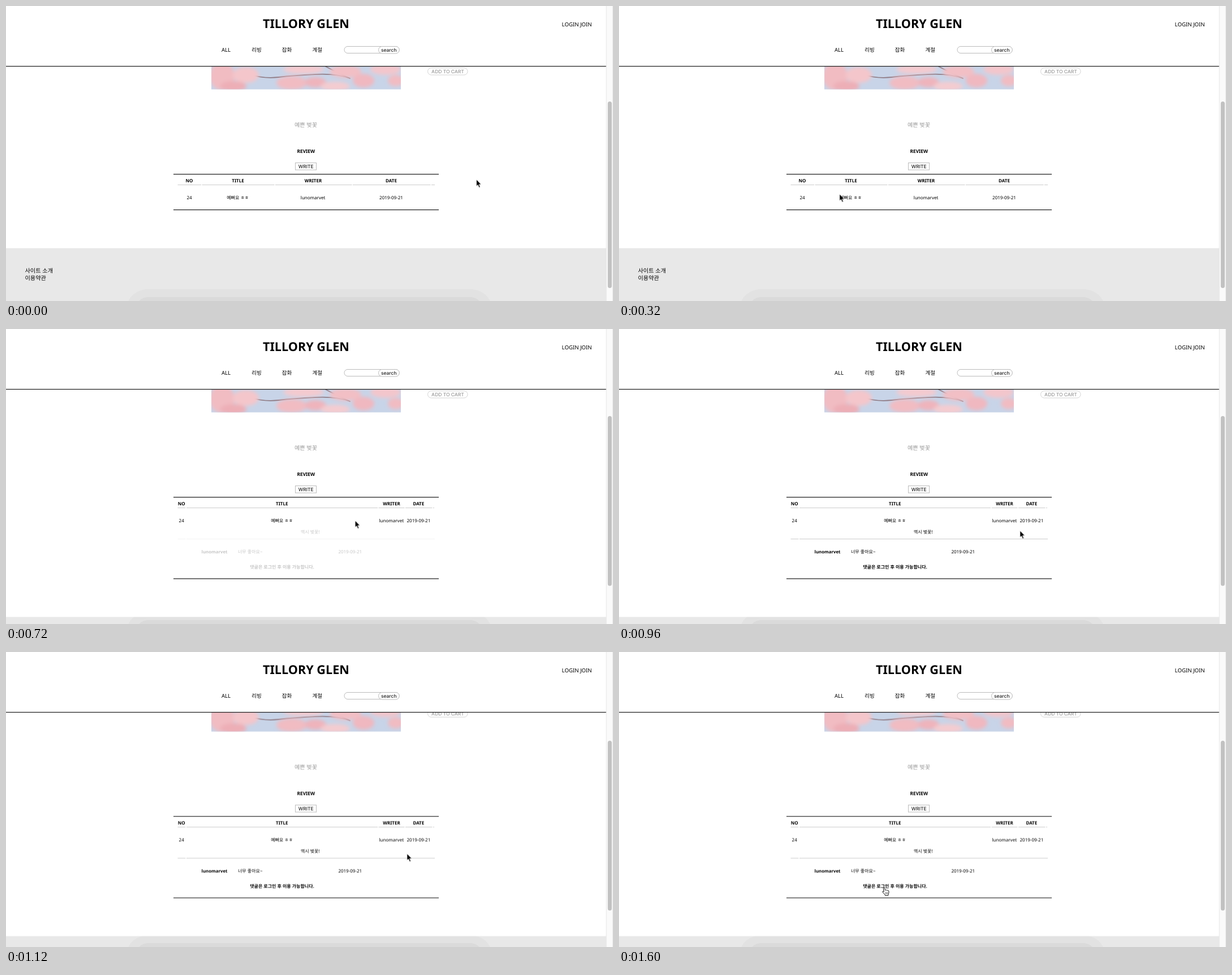
An HTML page that plays this animation: 1073x522 px, repeating every 1.68 s.

```html
<!DOCTYPE html>
<html lang="ko">
<head>
<meta charset="utf-8">
<title>Review page</title>
<style>
html, body { margin: 0; width: 100%; height: 100%; overflow: hidden; background: #fff; }
svg { display: block; width: 1073px; height: 522px; }
text {
  font: 500 8px "Noto Sans", "Noto Sans CJK KR", "Noto Sans CJK", sans-serif;
  fill: #000; text-rendering: geometricPrecision;
}
.mid { text-anchor: middle; }
.bold, .bold text { font-weight: 700; }
.ui { font-family: Inter, "Liberation Sans", sans-serif; font-size: 8.5px; fill: #222; }
.nav { font-size: 9.5px; }
.login { font-size: 9.6px; }
.large { font-size: 10.2px; }
.logo { font-size: 21.6px; }
.rule { stroke: #222; stroke-width: 1.3; }
.hair { stroke: #ccc; stroke-width: 1; }
.pill { fill: #fff; stroke: #bbb; }

.page, .sheet, .closed, .open, .fade, .thumb, .cursor, .arrow, .hand {
  animation: 1680ms step-end infinite;
}
.page { animation-name: scroll; }
.sheet { animation-name: grow; }
.closed { animation-name: hide; }
.open { animation-name: show; }
.fade { animation-name: fade; }
.thumb { animation-name: thumb; }
.cursor { animation-name: move; }
.arrow { animation-name: arrow; }
.hand { animation-name: hand; }

@keyframes scroll {
  0% { transform: none; }
  61.9% { transform: translateY(-3px); }
  66.66%, 100% { transform: translateY(-6.7px); }
}
@keyframes grow {
  0% { transform: none; }
  42.85%, 100% { transform: translateY(81px); }
}
@keyframes hide { 0% { opacity: 1; } 42.85%, 100% { opacity: 0; } }
@keyframes show { 0% { opacity: 0; } 42.85%, 100% { opacity: 1; } }
@keyframes fade {
  0% { opacity: .22; }
  47.61% { opacity: .55; }
  52.38% { opacity: .85; }
  57.14%, 100% { opacity: 1; }
}
@keyframes thumb {
  0% { y: 169px; height: 330px; }
  42.85% { y: 154px; height: 300.5px; }
  61.9% { y: 155.4px; height: 300.5px; }
  66.66%, 100% { y: 157px; height: 300.5px; }
}
@keyframes move {
  0% { transform: translate(831px, 306.5px); }
  4.76% { transform: translate(806px, 340px); }
  9.52% { transform: translate(600px, 382px); }
  14.28% { transform: translate(349px, 350px); }
  19.04% { transform: translate(389.3px, 332.3px); }
  23.8% { transform: translate(391px, 333px); }
  28.57% { transform: translate(393px, 334px); }
  33.33% { transform: translate(394px, 335px); }
  38.09% { transform: translate(395.3px, 335.5px); }
  42.85% { transform: translate(616.6px, 338.5px); }
  47.61% { transform: translate(675px, 350px); }
  52.38% { transform: translate(703px, 355px); }
  57.14% { transform: translate(708.3px, 356.3px); }
  71.42% { transform: translate(640px, 372px); }
  76.19% { transform: translate(480px, 395px); }
  80.95% { transform: translate(372px, 412px); }
  85.71% { transform: translate(420px, 416px); }
  90.47% { transform: translate(458px, 416px); }
  95.23%, 100% { transform: translate(465px, 416px); }
}
@keyframes arrow { 0% { opacity: 1; } 90.47%, 100% { opacity: 0; } }
@keyframes hand { 0% { opacity: 0; } 90.47%, 100% { opacity: 1; } }
</style>
</head>
<body>
<svg viewBox="0 0 1073 522">
  <defs>
    <clipPath id="frame"><rect x="363" y="60" width="335" height="87.5"/></clipPath>
    <filter id="soft" x="-20%" y="-20%" width="140%" height="140%"><feGaussianBlur stdDeviation="3"/></filter>
  </defs>

  <!-- footer, uncovered by the white sheet above it -->
  <rect width="1073" height="522" fill="#e8e8e8"/>
  <rect x="214" y="501" width="644" height="90" rx="38" ry="32" fill="#e2e2e2"/>
  <rect x="228" y="515" width="616" height="90" rx="24" fill="#dadada"/>

  <g class="page">
    <g class="sheet">
      <rect y="-100" width="1073" height="528.5" fill="#fff"/>
      <text class="large" x="33.5" y="471.5">사이트 소개</text>
      <text class="large" x="33.5" y="485">이용약관</text>
    </g>

    <g clip-path="url(#frame)">
      <rect x="363" y="60" width="335" height="88" fill="#c8d4e8"/>
      <path d="M430 121Q456 129 482 126T546 121T608 128M565 107Q588 119 608 128"
        fill="none" stroke="#8f7c86" stroke-width="1.8" stroke-linecap="round"/>
      <g filter="url(#soft)" fill="#f1bcc2">
        <ellipse cx="382" cy="124" rx="22" ry="25"/>
        <ellipse cx="424" cy="122" rx="23" ry="14" fill="#f4c6cb"/>
        <ellipse cx="402" cy="142" rx="23" ry="9" fill="#edaeb6"/>
        <ellipse cx="505" cy="136" rx="27" ry="12"/>
        <ellipse cx="526" cy="112" rx="36" ry="8" fill="#f4cacf"/>
        <ellipse cx="547" cy="135" rx="19" ry="9" fill="#efb4bc"/>
        <ellipse cx="600" cy="116" rx="28" ry="11" fill="#f2bfc5"/>
        <ellipse cx="582" cy="142" rx="26" ry="8" fill="#f4ccd0"/>
        <ellipse cx="632" cy="132" rx="19" ry="12" fill="#f0b8c0"/>
        <ellipse cx="671" cy="112" rx="27" ry="10" fill="#f3c6cc"/>
        <ellipse cx="689" cy="132" rx="14" ry="10"/>
      </g>
    </g>

    <rect class="pill" x="745.5" y="109.5" width="70.5" height="12.5" rx="6.2" style="stroke:#d3d3d3"/>
    <text class="ui mid" x="781" y="118.5" style="fill:#999">ADD TO CART</text>
    <text class="large mid" x="530" y="214" style="fill:#999">예쁜 벚꽃</text>
    <text class="mid bold" x="530.3" y="259.5" style="font-size:8.4px">REVIEW</text>
    <rect x="511.5" y="277.5" width="37" height="12.5" fill="#fff" stroke="#bbb"/>
    <text class="ui mid" x="530.2" y="286.8">WRITE</text>
    <path class="rule" d="M296 297.7H765"/>

    <g class="closed">
      <path class="hair" d="M303.5 316.5H345M346.5 316.5H474.5M476 316.5H611.5M613 316.5H750.5M752 316.5H758"/>
      <g class="mid bold">
        <text x="324" y="312.3">NO</text>
        <text x="410" y="312.3">TITLE</text>
        <text x="543" y="312.3">WRITER</text>
        <text x="681" y="312.3">DATE</text>
      </g>
      <g class="mid">
        <text x="324" y="342.4">24</text>
        <text x="409.7" y="342.4">예뻐요 ㅎㅎ</text>
        <text x="542.6" y="342.4">lunomarvet</text>
        <text x="681" y="342.4">2019-09-21</text>
      </g>
      <path class="rule" d="M296 360.6H765"/>
    </g>

    <g class="open">
      <path class="hair" d="M303.5 316.5H317.5M319 316.5H657M658.5 316.5H704.5M706 316.5H753.5M755 316.5H757"/>
      <g class="mid bold">
        <text x="310.2" y="312.3">NO</text>
        <text x="487.8" y="312.3">TITLE</text>
        <text x="681.5" y="312.3">WRITER</text>
        <text x="729.3" y="312.3">DATE</text>
      </g>
      <g class="mid">
        <text x="310.2" y="342.4">24</text>
        <text x="487.6" y="342.4">예뻐요 ㅎㅎ</text>
        <text x="681.3" y="342.4">lunomarvet</text>
        <text x="729.4" y="342.4">2019-09-21</text>
      </g>
      <g class="fade">
        <text class="mid" x="537.8" y="361.6">역시 벚꽃!</text>
        <path class="hair" d="M303.5 371.6H317.5M319 371.6H758"/>
        <text class="bold" x="345.6" y="396.8" style="font-size:7.8px">lunomarvet</text>
        <text x="410" y="396.8">너무 좋아요~</text>
        <text x="587.4" y="396.8">2019-09-21</text>
        <text class="mid bold" x="488" y="423.8">댓글은 로그인 후 이용 가능합니다.</text>
      </g>
      <path class="rule" d="M296 441.8H765"/>
    </g>
  </g>

  <!-- fixed header -->
  <rect width="1061" height="106.5" fill="#fff"/>
  <path class="rule" d="M0 106.7H1061"/>
  <text class="logo mid bold" x="530.4" y="38.8">TILLORY GLEN</text>
  <text class="login" x="982.6" y="35.7">LOGIN JOIN</text>
  <g class="mid">
    <text class="nav" x="389" y="81">ALL</text>
    <text class="nav" x="443" y="81">리빙</text>
    <text class="nav" x="496.5" y="81">잡화</text>
    <text class="nav" x="550.3" y="81">계절</text>
  </g>
  <rect class="pill" x="598" y="71.5" width="97" height="12" rx="6"/>
  <rect class="pill" x="658.5" y="71.5" width="36.8" height="12.5" rx="6.2"/>
  <text class="ui mid" x="676.7" y="81">search</text>

  <rect x="1061" width="12" height="522" fill="#fafafa"/>
  <path d="M1061.2 0V522M1072.5 0V522" stroke="#e6e6e6"/>
  <rect class="thumb" x="1063.8" y="169" width="7" height="330" rx="3.5" fill="#c1c1c1"/>

  <g class="cursor" stroke-linejoin="round">
    <path class="arrow" d="M.5 .5V12.5L3.2 10L5.2 14.7L7.3 13.8L5.3 9.2H9Z" fill="#000" stroke="#fff" stroke-width=".8"/>
    <g class="hand" stroke="#111" stroke-width="1">
      <path d="M3.2 8.6L2.3 2.2Q2.2 .7 3.4 .7Q4.4 .7 4.7 2L5.4 5.5Q6.5 4.5 7.5 5.6Q8.7 4.8 9.6 6Q11.7 5.4 12 7.7Q12.2 11 11 12.7V14.6H5.2V13.2L1.2 9.4Q.2 8 1.3 7.4Q2.2 7.1 3.2 8.6Z" fill="#fff"/>
      <path d="M6.2 9.3V12M8 9.3V12M9.8 9.3V12" stroke-width=".7"/>
    </g>
  </g>
</svg>
</body>
</html>
```
